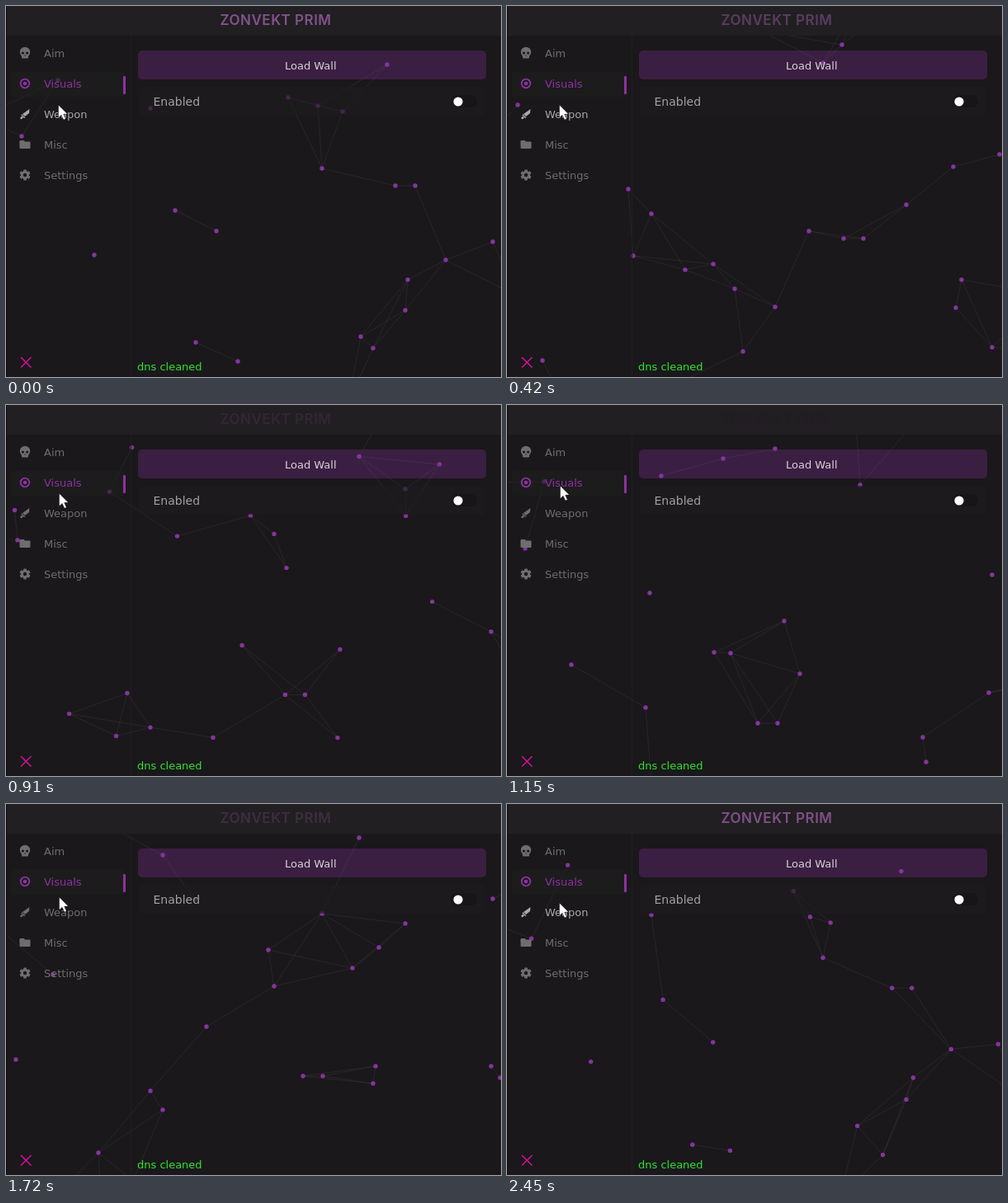
Write an HTML page with a canvas that moves like this. It is 600 by 450 pixels and loops after 2480 ms.

```html
<!DOCTYPE html>
<html lang="en">
<head>
<meta charset="utf-8">
<style>
  html, body { margin: 0; width: 100%; height: 100%; overflow: hidden; background: #1a181a; }
  canvas { display: block; width: 600px; height: 450px; }
</style>
</head>
<body>
<canvas id="stage" width="600" height="450"></canvas>
<script>
const ctx = document.getElementById('stage').getContext('2d');
const BG = '#1a181a', GREY = '#6f6d6f', PURPLE = '#8e31a2', DOT = '#8534a0';
const LOOP = 2480, STEPS = 82, LINK = 106;

// Starting points of the drifting dots, grouped by velocity.
const groups = {
  '3,2': [[462, 71]],
  '1,-1': [[342, 111], [0, 535], [-123, 261]],
  '-2,3': [[378, 121], [607, -203], [669, 3]],
  '-3,3': [[408, 128]],
  '0,-2': [[383, 197], [484, 369], [588, 542]],
  '-1,1': [[472, 218], [496, 218], [230, 408]],
  '-3,-2': [[205, 248], [926, 339]],
  '-1,3': [[255, 273]],
  '-1,2': [[107, 302], [341, -108]],
  '1,-2': [[533, 308], [340, 769]],
  '1,0': [[487, 332]],
  '-1,-2': [[430, 401], [672, 739]],
  '2,2': [[445, 415]],
  '-2,-2': [[281, 431]],
  '1,1': [[590, 286], [620, 352], [19, -82]],
  '0,2': [[175, 124]],
  '2,-3': [[63, 90]],
  '2,1': [[19, 158]],
  '0,-3': [[325, 557], [251, 804]],
  '3,-3': [[84, 535]],
  '3,3': [[116, -162], [-324, -26]],
  '-2,-1': [[414, 483], [672, 430]],
  '-3,2': [[526, -162]],
  '0,1': [[428, -71]],
  '-2,1': [[920, 181]],
  '-2,0': [[-30, 135]]
};
const dots = Object.entries(groups).flatMap(([velocity, points]) => {
  const [vx, vy] = velocity.split(',').map(Number);
  return points.map(([x, y]) => ({ x, y, vx, vy }));
});

const travelKeys = [[0, 0], [1, 5.3], [14, 64], [23, 102], [25, 112], [38, 168], [41, 181]];
const cursorX = [[0, 63.5], [14, 63.5], [23, 64.5], [41, 64.5]];
const cursorY = [[0, 120], [17, 120], [23, 116], [25, 113], [38, 98], [41, 97]];
const hoverKeys = [[0, 1], [15, 1], [22, 0], [41, 0]];

const clamp = (v, lo, hi) => Math.min(hi, Math.max(lo, v));

function keyed(keys, s) {
  const i = Math.max(1, keys.findIndex(k => k[0] >= s));
  const [a, va] = keys[i - 1], [b, vb] = keys[i];
  return va + (vb - va) * (s - a) / (b - a);
}

function mix(from, to, k) {
  return `rgb(${from.map((v, i) => Math.round(v + (to[i] - v) * k)).join(',')})`;
}

function box(x, y, w, h, r, color) {
  ctx.fillStyle = color;
  ctx.beginPath();
  ctx.roundRect(x, y, w, h, r);
  ctx.fill();
}

function disc(x, y, r, color) {
  ctx.fillStyle = color;
  ctx.beginPath();
  ctx.arc(x, y, r, 0, Math.PI * 2);
  ctx.fill();
}

function poly(points, color) {
  ctx.fillStyle = color;
  ctx.beginPath();
  points.forEach(([x, y]) => ctx.lineTo(x, y));
  ctx.closePath();
  ctx.fill();
}

function label(text, x, y, color, size = 13) {
  ctx.font = `${size}px "DejaVu Sans", sans-serif`;
  ctx.fillStyle = color;
  ctx.fillText(text, x, y);
}

function drawNetwork(travel) {
  const now = dots.map(d => [d.x + d.vx * travel, d.y + d.vy * travel]);
  ctx.strokeStyle = 'rgba(130,120,130,.14)';
  ctx.lineWidth = 1;
  ctx.beginPath();
  now.forEach(([x, y], i) => {
    for (const [u, v] of now.slice(i + 1)) {
      if (Math.hypot(x - u, y - v) < LINK) {
        ctx.moveTo(x, y);
        ctx.lineTo(u, v);
      }
    }
  });
  ctx.stroke();
  now.forEach(([x, y]) => disc(x, y, 2.7, DOT));
}

function skull(x, y) {
  disc(x, y - 1, 6.2, GREY);
  box(x - 4, y + 2, 8, 4.5, 1, GREY);
  disc(x - 2.6, y, 1.6, BG);
  disc(x + 2.6, y, 1.6, BG);
  box(x - 0.5, y + 2.5, 1, 1.5, 0, BG);
}

function target(x, y) {
  ctx.strokeStyle = PURPLE;
  ctx.lineWidth = 1.8;
  ctx.beginPath();
  ctx.arc(x, y, 5.3, 0, Math.PI * 2);
  ctx.stroke();
  disc(x, y, 2.3, PURPLE);
}

function knife(x, y, color) {
  poly([[x + 5.5, y - 6], [x + 5, y - 1], [x, y + 3], [x - 3, y]], color);
  poly([[x - 4, y], [x + 0.5, y + 4.5], [x - 1, y + 5], [x - 4.5, y + 1.5]], color);
  poly([[x - 4, y + 2.5], [x - 2, y + 4.5], [x - 4.5, y + 6.5], [x - 6, y + 5]], color);
}

function folder(x, y) {
  box(x - 6.5, y - 5, 6, 4, 1, GREY);
  box(x - 6.5, y - 3.5, 13, 8.5, 1, GREY);
}

function gear(x, y) {
  for (let i = 0; i < 6; i++) {
    ctx.save();
    ctx.translate(x, y);
    ctx.rotate(i * Math.PI / 3);
    box(-1.9, -6.6, 3.8, 4, 0.8, GREY);
    ctx.restore();
  }
  disc(x, y, 5, GREY);
  disc(x, y, 2.2, BG);
}

function drawSidebar(hover) {
  const weapon = mix([111, 109, 111], [170, 168, 170], hover);
  box(151, 36, 1, 414, 0, '#201e20');
  box(142, 85, 3, 22, 1, PURPLE);
  skull(23, 57);
  target(23, 94);
  knife(23, 131, weapon);
  folder(23, 168);
  gear(23, 205);
  ['Aim', 'Visuals', 'Weapon', 'Misc', 'Settings'].forEach((name, i) => {
    const color = i === 1 ? PURPLE : i === 2 ? weapon : GREY;
    label(name, 46, 62 + 37 * i, color);
  });
  ctx.strokeStyle = '#d6109c';
  ctx.lineWidth = 1.5;
  ctx.beginPath();
  ctx.moveTo(18, 426);
  ctx.lineTo(30.5, 438.5);
  ctx.moveTo(30.5, 426);
  ctx.lineTo(18, 438.5);
  ctx.stroke();
}

function drawHeader(step) {
  box(0, 0, 600, 36, 0, '#211f21');
  const glow = Math.pow(1 - step / 42, 1.2);
  ctx.font = '600 17px Inter, sans-serif';
  ctx.letterSpacing = '0.5px';
  ctx.textAlign = 'center';
  ctx.fillStyle = mix([28, 26, 28], [130, 82, 140], glow);
  ctx.fillText('ZONVEKT PRIM', 327, 23);
  ctx.letterSpacing = '0px';
  ctx.textAlign = 'left';
}

function drawCursor(x, y) {
  ctx.save();
  ctx.translate(x, y);
  poly([[0, 0], [0, 15.5], [3.6, 12.2], [6.3, 18], [8.8, 16.9], [6.2, 11.3], [11, 11]], '#fff');
  ctx.strokeStyle = 'rgba(0,0,0,.6)';
  ctx.lineWidth = 0.7;
  ctx.stroke();
  ctx.restore();
}

function draw(step) {
  box(0, 0, 600, 450, 0, BG);
  box(160, 54, 422, 35, 5, '#3b1f42');
  drawNetwork(keyed(travelKeys, step));
  box(6, 80, 138, 30, 4, 'rgba(32,30,32,.6)');
  box(161, 98, 419, 35, 5, 'rgba(31,29,31,.65)');
  drawHeader(step);
  drawSidebar(keyed(hoverKeys, step));
  label('Load Wall', 338, 77, '#d8d3d9');
  label('Enabled', 178.5, 120.5, '#a3a1a3', 14);
  box(540, 108, 31, 15, 7.5, '#171517');
  disc(548, 116, 5.6, '#fff');
  label('dns cleaned', 159, 442, '#2fe62f');
  box(0, 0, 1, 450, 0, '#0d0c0d');
  drawCursor(keyed(cursorX, step), keyed(cursorY, step));
}

// Steps last 30 ms, with one 10 ms longer on the way out and one on the way back.
function stepAt(time) {
  const held = clamp(time - 779, 0, 10) + clamp(time - 1749, 0, 10);
  const n = Math.floor((time - held) / 30);
  return clamp(Math.min(n, STEPS - n), 0, 41);
}

let start;
function tick(now) {
  start ??= now;
  draw(stepAt((now - start) % LOOP));
  requestAnimationFrame(tick);
}
draw(0);
requestAnimationFrame(tick);
</script>
</body>
</html>
```
